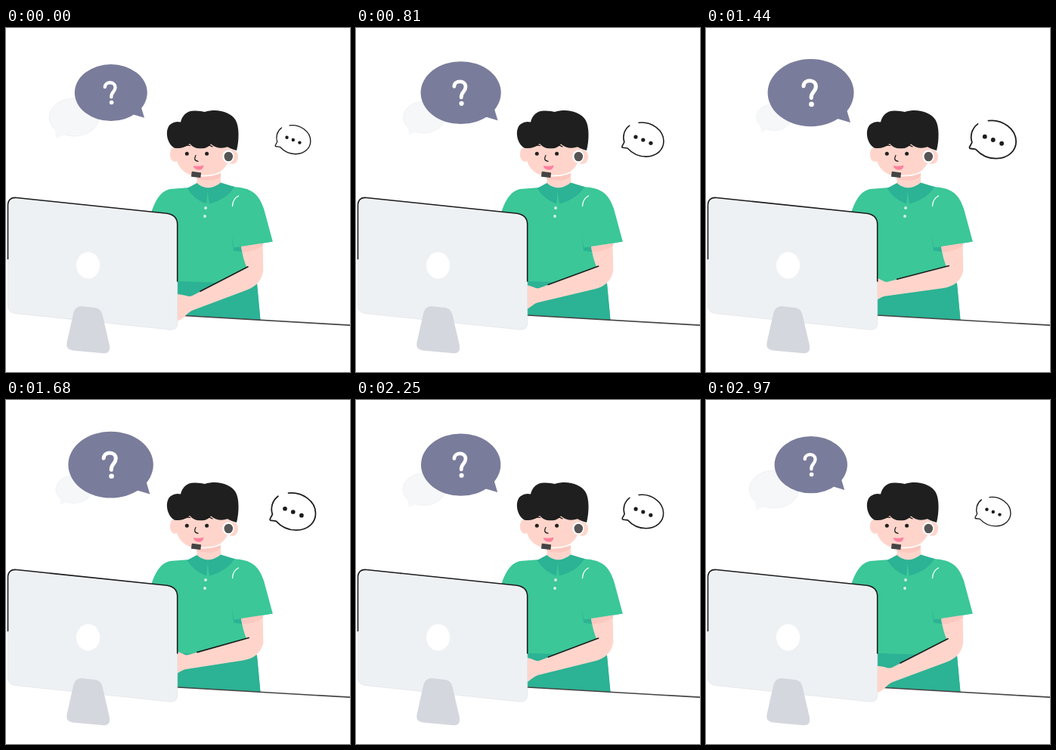
These frames come from a looping animation (455 px wide and 455 px high, 3000 ms). An HTML page:

```html
<!DOCTYPE html>
<html lang="en">
<head>
<meta charset="utf-8">
<title>Support agent</title>
<style>
  html, body { margin: 0; width: 100%; height: 100%; overflow: hidden; background: #fff; }
  svg { display: block; width: 100vw; height: 100vh; }
  .skin { fill: #ffd5cb; }
  .shirt { fill: #3bc798; }
  .shade { fill: #2cb294; }
  .ink { fill: none; stroke: #1c1c1c; stroke-linecap: round; stroke-linejoin: round; }
  .white { fill: none; stroke: #fff; stroke-linecap: round; stroke-linejoin: round; }
</style>
</head>
<body>
<svg viewBox="0 0 455 455">
  <g id="pale" fill="#f5f7f9">
    <ellipse cx="90" cy="118" rx="32.8" ry="25" stroke="#e9ebee" stroke-width=".7"/>
    <path d="M64 131 L66.3 146 L80 140Z"/>
  </g>

  <g id="ask" fill="#7a7c9b">
    <ellipse cx="138.8" cy="85.6" rx="48" ry="37.5"/>
    <path d="M178 102 L183 118.8 L160 112Z"/>
    <path class="white" stroke-width="4.3" d="M130.8 78.2 C131 70.2 144.5 70.2 144.5 78.5 C144.5 84.7 138.9 84.5 139.3 91.3"/>
    <circle cx="139.6" cy="98.5" r="2.8" fill="#fff"/>
  </g>

  <g id="reply">
    <path class="ink" stroke-width="1.35" d="M364.5 132 C358.5 136.5 356.5 144 358.7 150.5 L356.2 155.2 Q356 156.8 357.5 156.7 L362.3 157.3 C368 163.5 375 166.7 383 166.7 C395 166.5 402.8 159 402.8 149.5 C402.8 137 389 127 375 128.8"/>
    <g fill="#1c1c1c">
      <circle cx="371.5" cy="144.7" r="2.2"/>
      <circle cx="379.8" cy="148" r="2.2"/>
      <circle cx="388.4" cy="151.6" r="2.2"/>
    </g>
  </g>

  <!-- body -->
  <path class="shirt" d="M191 248 C196 231 203 216 217 213 L243 211 L283 206 L305 210.5 C326 212 335 221 341 239 L352.8 282.6 L311 289.5 L332 338 L336.5 386.3 L215 379 V290Z"/>
  <path class="shade" d="M215 334.5 L290 337 L332 338 L336.5 386.3 L215 379Z"/>
  <path class="ink" stroke-width="1.6" style="stroke:#444" d="M215 379.3 L456 393.2"/>
  <path class="shade" d="M298.5 274.5 L301.5 290 L314 289 V296.5 L301 294.5Z"/>
  <path class="skin" d="M311 288 L339.5 284 L340.3 322 L327 334 L319 318 Q313 305 311 288Z"/>
  <path fill="#fcc8bf" d="M311 289 L339.8 284.5 V288 Q327 296.5 312.2 296.5Z"/>
  <path class="shirt" d="M299 274 L340 270 L352.8 282.6 L301.5 290.5Z"/>
  <path class="white" stroke-width="1.3" d="M299.5 235.5 Q300 226 307.5 222"/>

  <g id="forearm">
    <path class="skin" d="M320 316 L246.5 354 Q243 355.8 239 354.3 Q232 352 212 351 L205 388 L226 387.5 C235 386 239 377 246 373.8 L318 346.7 C333 341.5 340.2 331 340 318 L330 310Z"/>
    <path class="ink" stroke-width="1.6" d="M320 315.8 L257 348.3"/>
  </g>

  <!-- neck and collar -->
  <path class="skin" d="M252.5 188 H284 V206 L267 213.5 L252.5 206Z"/>
  <path fill="#fcc8bf" d="M252.5 195 Q270 199 284 190 V196 Q276 205 252.5 200Z"/>
  <path class="shade" d="M239.5 212 L252.5 205 Q258 210.5 267 211.5 L265 232.5 Q249 227 239.5 212Z"/>
  <path class="shade" d="M284 204.5 L302 210 Q293 226 269 232.5 L266 211.5 Q277 211 284 204.5Z"/>
  <g fill="#d9f5ea">
    <circle cx="264" cy="238" r="1.9"/>
    <circle cx="263" cy="249" r="1.9"/>
  </g>

  <!-- head -->
  <g class="skin">
    <ellipse cx="223.5" cy="167" rx="6.7" ry="10"/>
    <ellipse cx="299.5" cy="170.5" rx="7.5" ry="9.5"/>
    <path d="M224.5 145 H297 V168 C293 187 278 197 260 197 C238 197 224 185 224.5 163Z"/>
  </g>
  <path fill="#1f1f1f" d="M305 162 Q299 161 293 157.3 Q281 161.5 271 153.5 Q266 159.8 258 159.2 Q249 160 243 153 Q234 160.5 223 158.8 C212 153 209.5 133 218 127 Q224 122.500 231 124.500 C233 115 240 108.500 251 109.500 Q258 109.500 263 111 C280 106 297 111.500 303.500 121.500 C308.800 130 308.500 149 305 162Z"/>
  <g class="ink" stroke-width="1.3">
    <path d="M234 157 Q239 154 243.5 155.5"/>
    <path d="M261.5 155.5 Q268 153.5 273 157"/>
    <path d="M251 168.5 Q247 175 254 176.3"/>
  </g>
  <g fill="#222">
    <circle cx="239.3" cy="166.2" r="2.5"/>
    <circle cx="265.6" cy="166.3" r="2.5"/>
  </g>
  <path fill="#ff809f" d="M247.5 182.3 Q255 183.5 261.5 181.5 Q261 187.8 255 187.8 Q249.5 187.5 247.5 182.3Z"/>

  <!-- headset -->
  <path class="white" stroke-width="1.6" d="M295 178 C291 191 276 196 257 195.5"/>
  <ellipse cx="294" cy="170" rx="7.7" ry="8.6" fill="#fff"/>
  <ellipse cx="294.3" cy="170" rx="5.8" ry="6.3" fill="#555"/>
  <rect x="245.3" y="190.5" width="12.5" height="7" rx=".6" fill="#444" transform="rotate(7 252 194)"/>

  <!-- monitor -->
  <path fill="#eef1f4" stroke="#e0e3e7" stroke-width=".7" d="M2.5 235 Q2.5 223.5 14 224.5 L213 245.3 Q226.7 247.5 226.7 260 V390 Q226.7 399.8 217 399 L12 377.5 Q2.5 376 2.5 367Z"/>
  <path class="ink" stroke-width="1.6" d="M2.5 305.5 V235 Q2.5 223.5 14 224.5 L213 245.3 Q226.7 247.5 226.7 260 V335"/>
  <ellipse cx="108.6" cy="314" rx="15.6" ry="17.5" fill="#fff"/>
  <path fill="#d5d7df" d="M89 378 Q91.5 367.5 100 368 L118 370 Q125.5 371 127.5 379 L137 420 Q138.5 430.5 129 430.3 L88 426.5 Q78.5 425 80.5 416Z"/>
</svg>
<script>
  const LOOP = 3000, STEP = 30;
  const pose = (id, transform) => document.getElementById(id).setAttribute("transform", transform);
  const zoom = (id, x, y, s) => pose(id, `translate(${x} ${y}) scale(${s}) translate(${-x} ${-y})`);

  // Every part moves evenly to its far pose at mid-loop and back.
  function draw(now) {
    const t = Math.floor((now % LOOP) / STEP) * STEP;
    const k = 1 - Math.abs(1 - 2 * t / LOOP);
    zoom("pale", 90, 118, 1 - 0.3 * k);
    zoom("ask", 140, 85.5, 1 + 0.195 * k);
    zoom("reply", 380, 148, 1 + 0.335 * k);
    pose("forearm", `rotate(${13.3 * k} 326.5 321)`);
    requestAnimationFrame(draw);
  }
  draw(performance.now());
</script>
</body>
</html>
```
